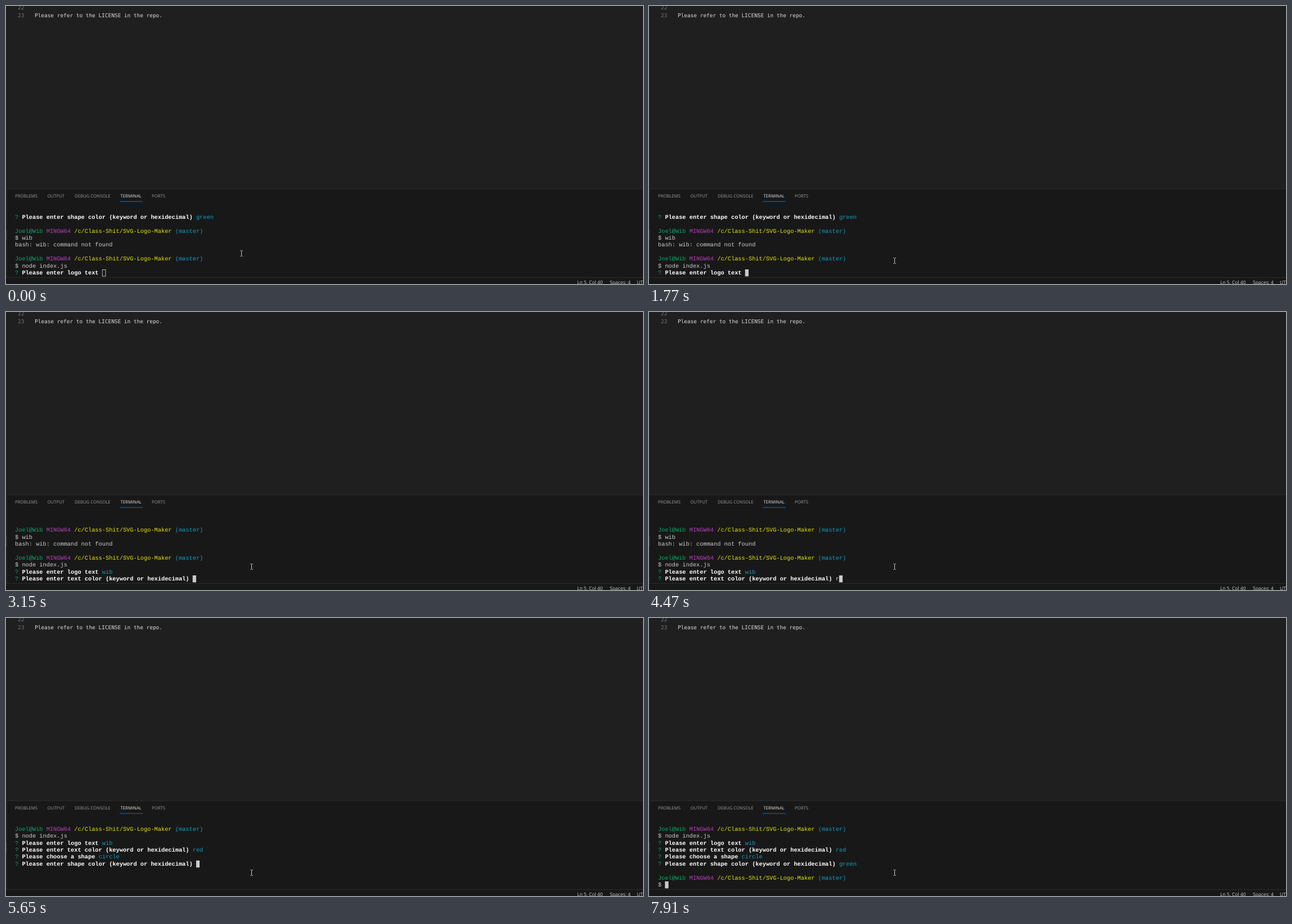
Animation, 1132 px wide and 495 px high, one loop 8000 ms. Source, as an HTML page with a canvas:

```html
<!DOCTYPE html>
<html lang="en">
<head>
<meta charset="utf-8">
<title>Terminal session</title>
<style>
  html, body { margin: 0; width: 100%; height: 100%; overflow: hidden; background: #181818; }
  canvas { display: block; }
</style>
</head>
<body>
<canvas id="stage" width="1132" height="495"></canvas>
<script>
const LOOP = 8000;
const ctx = document.getElementById('stage').getContext('2d');
ctx.textRendering = 'geometricPrecision';

const MONO = '"Liberation Mono", monospace';
const CODE = '9.43px "DejaVu Sans Mono", monospace';
const UI = '"Open Sans", "Noto Sans", sans-serif';
const C = {
  fg: '#cccccc', bold: '#ffffff', green: '#0ca66b', magenta: '#bc3fbc',
  yellow: '#e5e510', cyan: '#119dc0', border: '#2b2b2b'
};

// Terminal grid
const LEFT = 16, TOP = 369.8, CELL = 6.19, ROW = 12.4, ROWS = 9;

// Pointer: [time, x, y], held until the next entry
const pointer = [
  [0, 418, 440], [70, 422, 440],
  [330, 431, 442], [400, 446, 444], [470, 460, 447], [540, 471, 450], [610, 477, 452],
  [940, 475, 455], [1010, 471, 457], [1080, 467, 459], [1150, 461, 460],
  [1220, 452, 459], [1290, 442, 457], [1360, 433, 455], [1430, 429, 454],
  [1630, 431, 454], [1700, 434, 453], [1770, 436, 453]
];

const TIMES = {
  focus: 1430,
  logo: [2300, 2430, 2560], textColor: 3150,
  red: [4470, 4600, 4730], choose: 4860, shapeColor: 5650,
  green: [7040, 7170, 7300, 7430, 7500], done: 7770, next: 7840, prompt: 7910
};

const plain = s => [[s, C.fg]];
const shellPrompt = [
  ['Joel@Wib', C.green], [' MINGW64', C.magenta],
  [' /c/Class-Shit/SVG-Logo-Maker', C.yellow], [' (master)', C.cyan]
];
const ask = (question, answer = '', color = C.cyan) =>
  [['? ', C.green], [question + ' ', C.bold, true], [answer, color]];

const Q = {
  logo: 'Please enter logo text',
  text: 'Please enter text color (keyword or hexidecimal)',
  shape: 'Please choose a shape',
  fill: 'Please enter shape color (keyword or hexidecimal)'
};

const history = [
  ask(Q.fill, 'green'), [],
  shellPrompt, plain('$ wib'), plain('bash: wib: command not found'), [],
  shellPrompt, plain('$ node index.js')
];

const typed = (word, times, t) => word.slice(0, times.filter(k => t >= k).length);
const length = line => line.reduce((n, [s]) => n + s.length, 0);

// Lines and caret for a given time; the caret sits after the last line
function session(t) {
  const lines = history.slice();
  let caret = true;
  const input = (q, word, times, end) =>
    lines.push(t < end ? ask(q, typed(word, times, t), C.fg) : ask(q, word));

  input(Q.logo, 'wib', TIMES.logo, TIMES.textColor);
  if (t >= TIMES.textColor) input(Q.text, 'red', TIMES.red, TIMES.choose);
  if (t >= TIMES.shapeColor) {
    lines.push(ask(Q.shape, 'circle'));
    input(Q.fill, 'green', TIMES.green, TIMES.done);
  } else if (t >= TIMES.choose) {
    lines.push(ask(Q.shape, '(Use arrow keys)', C.fg), [['> circle', C.cyan]]);
    ['triangle', 'square', 'rectangle'].forEach(s => lines.push(plain('  ' + s)));
    caret = false;
  }
  if (t >= TIMES.done) lines.push([]);
  if (t >= TIMES.prompt) lines.push(shellPrompt, plain('$ '));
  else if (t >= TIMES.next) lines.push([]);

  const scroll = t >= TIMES.choose ? 6 : lines.length - ROWS;
  return { rows: lines.slice(scroll), caret };
}

function rect(x, y, w, h, color) {
  ctx.fillStyle = color;
  ctx.fillRect(x, y, w, h);
}

function text(s, x, y, font, color) {
  ctx.font = font;
  ctx.fillStyle = color;
  ctx.fillText(s, x, y);
}

function drawLine(line, row) {
  let col = 0;
  for (const [s, color, bold] of line) {
    const font = `${bold ? 'bold ' : ''}10.32px ${MONO}`;
    for (const ch of s) {
      if (ch !== ' ') text(ch, LEFT + col * CELL, TOP + row * ROW + 9, font, color);
      col++;
    }
  }
}

function drawCaret(col, row, focused) {
  const x = LEFT + col * CELL, y = TOP + row * ROW;
  if (focused) return rect(x, y, CELL, ROW, C.fg);
  ctx.strokeStyle = C.fg;
  ctx.lineWidth = 0.9;
  ctx.strokeRect(x + 0.5, y + 0.5, CELL - 0.5, ROW - 0.8);
}

function drawPointer(t) {
  const [, x, y] = pointer.filter(p => t >= p[0]).pop();
  rect(x, y - 4, 1, 9, '#d0d0d0');
  for (const edge of [y - 5, y + 5]) {
    rect(x - 2, edge, 2, 1, '#a8a8a8');
    rect(x + 1, edge, 2, 1, '#a8a8a8');
  }
}

function drawWindow() {
  rect(0, 0, 1132, 325, '#1f1f1f');
  rect(0, 325, 1132, 170, '#181818');
  rect(0, 325, 1132, 1, C.border);
  rect(0, 483, 1132, 1, C.border);
  rect(1, 325, 1, 158, '#242424');
  rect(0, 400, 1, 18, '#3c3c3c');

  text('22', 21, 6, CODE, '#6e7681');
  text('23', 21, 20, CODE, '#6e7681');
  text('Please refer to the LICENSE in the repo.', 51, 20, CODE, '#dcdcdc');

  const tabs = [['PROBLEMS', 16], ['OUTPUT', 73.5], ['DEBUG CONSOLE', 122],
    ['TERMINAL', 203.5], ['PORTS', 259]];
  for (const [name, x] of tabs)
    text(name, x, 341.3, `7.75px ${UI}`, name === 'TERMINAL' ? '#e7e7e7' : '#9d9d9d');
  rect(202, 347.6, 41, 1, '#0078d4');

  const status = [['Ln 5, Col 40', 1015], ['Spaces: 4', 1073], ['UTF-8', 1121]];
  for (const [s, x] of status) text(s, x, 495, `8.5px ${UI}`, C.fg);
}

function draw(t) {
  drawWindow();
  const { rows, caret } = session(t);
  rows.forEach(drawLine);
  if (caret) drawCaret(length(rows[rows.length - 1]), rows.length - 1, t >= TIMES.focus);
  drawPointer(t);
}

const start = performance.now();
function tick() {
  draw((performance.now() - start) % LOOP);
  requestAnimationFrame(tick);
}
tick();
</script>
</body>
</html>
```
